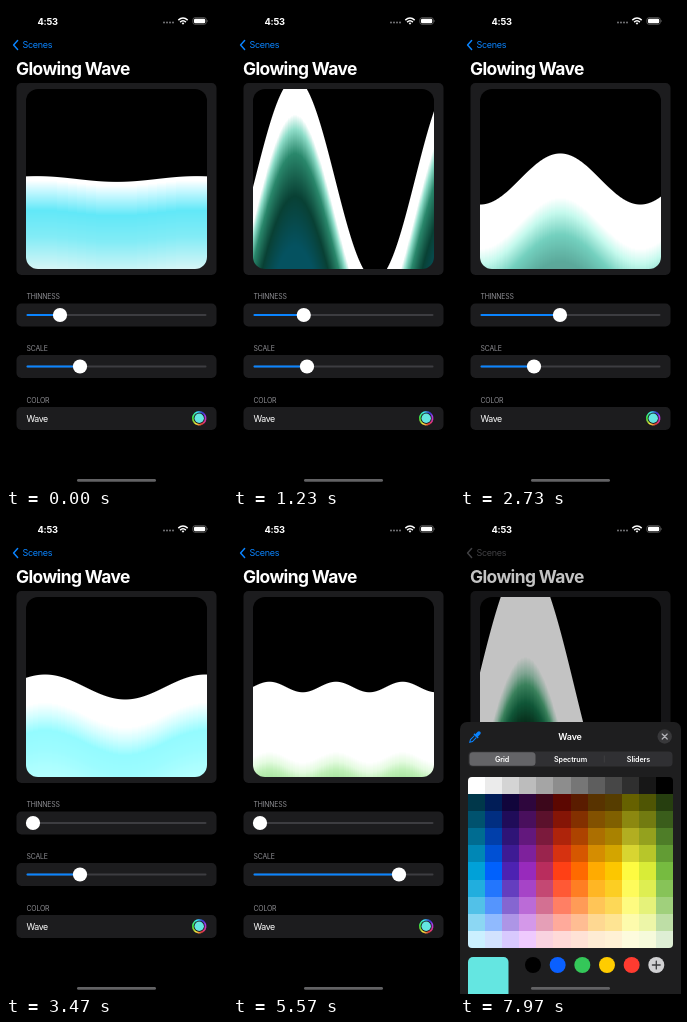
An HTML page with a canvas for the animation above (8 s loop, 221 px wide and 480 px high).

```html
<!DOCTYPE html>
<html lang="en">
<head>
<meta charset="utf-8">
<title>Glowing Wave</title>
<style>
  html, body { margin: 0; width: 100%; height: 100%; overflow: hidden; background: #000; }
  svg { position: absolute; left: 0; top: 0; width: 221px; height: 480px; display: block; }
  canvas { position: absolute; left: 20px; top: 83px; width: 181px; height: 180px; border-radius: 12px; }
  text { font-family: Inter, Roboto, sans-serif; fill: #fff; }
  .head { font-size: 6.9px; letter-spacing: -.2px; fill: #8e8e93; }
  .tab { font-size: 7.2px; font-weight: 600; text-anchor: middle; letter-spacing: -.1px; }
</style>
</head>
<body>
<svg viewBox="0 0 221 480">
  <g id="nav" stroke="#0a84ff">
    <path d="M11.6 34.6L7.6 39L11.6 43.4" fill="none" stroke-width="1.5" stroke-linecap="round" stroke-linejoin="round"/>
    <text id="back" x="16.5" y="42.4" font-size="9" letter-spacing="-.3" stroke="none">Scenes</text>
  </g>
  <text x="10" y="69" font-size="17.4" font-weight="700" letter-spacing="-.6">Glowing Wave</text>
  <g fill="#1c1c1e">
    <rect x="10.5" y="77" width="200" height="192" rx="5"/>
    <rect x="10.5" y="297.5" width="200" height="23" rx="5"/>
    <rect x="10.5" y="349" width="200" height="23" rx="5"/>
    <rect x="10.5" y="401" width="200" height="23" rx="5"/>
  </g>
  <text class="head" x="20.5" y="293">THINNESS</text>
  <text class="head" x="20.5" y="345">SCALE</text>
  <text class="head" x="20.5" y="396.5">COLOR</text>
  <g id="sliders"></g>
  <text x="20.5" y="415.6" font-size="8.8" letter-spacing="-.4">Wave</text>
  <g id="well"></g>
</svg>
<canvas id="wave" width="181" height="180"></canvas>
<svg viewBox="0 0 221 480">
  <rect id="dim" width="221" height="480" opacity="0"/>
  <text x="31.5" y="18.6" font-size="9.3" font-weight="700" letter-spacing="-.2">4:53</text>
  <g fill="#77777a">
    <circle cx="158" cy="16.6" r="1"/><circle cx="161" cy="16.6" r="1"/>
    <circle cx="164" cy="16.6" r="1"/><circle cx="167" cy="16.6" r="1"/>
  </g>
  <g fill="none" stroke="#fff" stroke-width="1.5">
    <path d="M172.3 14.1Q177 9.9 181.7 14.1M174.1 16.1Q177 13.5 179.9 16.1"/>
    <path d="M175.6 17L177 18.7L178.4 17Q177 16 175.6 17Z" fill="#fff" stroke="none"/>
  </g>
  <rect x="186.9" y="11.7" width="13.4" height="6.6" rx="2.1" fill="none" stroke="#777" stroke-width=".7"/>
  <rect x="188" y="12.8" width="11.2" height="4.4" rx="1.2" fill="#fff"/>
  <path d="M201.2 13.8Q202.6 15 201.2 16.2Z" fill="#777"/>
  <g id="sheet">
    <rect width="221" height="320" rx="7" fill="#1e1e1f"/>
    <g transform="translate(15 15) rotate(45)" fill="#0a84ff">
      <rect x="-1.8" y="-7.4" width="3.6" height="6" rx="1.8"/>
      <rect x="-3" y="-2.4" width="6" height="1.7" rx=".8"/>
      <path d="M-1.4 -.4V5L0 7.4L1.4 5V-.4" fill="none" stroke="#0a84ff" stroke-width="1"/>
    </g>
    <text x="110" y="18" font-size="9" font-weight="600" text-anchor="middle" letter-spacing="-.2">Wave</text>
    <circle cx="204.7" cy="14.5" r="7.2" fill="#38383a"/>
    <path d="M202.2 12L207.2 17M207.2 12L202.2 17" stroke="#b5b5ba" stroke-width="1.2" stroke-linecap="round"/>
    <rect x="8.5" y="29.5" width="204" height="15" rx="4" fill="#303033"/>
    <rect x="9.5" y="30.3" width="66" height="13.4" rx="3.5" fill="#646467"/>
    <path d="M144.3 33.5V40.5" stroke="#48484a" stroke-width=".6"/>
    <text class="tab" x="42" y="39.7">Grid</text>
    <text class="tab" x="110.5" y="39.7">Spectrum</text>
    <text class="tab" x="178.5" y="39.7">Sliders</text>
    <clipPath id="round"><rect x="8" y="55" width="205" height="171" rx="4"/></clipPath>
    <g id="grid" clip-path="url(#round)" shape-rendering="crispEdges"></g>
    <rect x="8" y="235" width="40.5" height="41" rx="5" fill="#64e6e1"/>
    <g id="dots"></g>
    <path d="M192.4 243H200.2M196.3 239.1V246.9" stroke="#3a3a3c" stroke-width="1.3" stroke-linecap="round"/>
  </g>
  <rect x="71" y="473" width="79" height="2.8" rx="1.4" fill="#626264"/>
</svg>
<script>
const LOOP = 8000;
const $ = id => document.getElementById(id);
const clamp = v => Math.max(0, Math.min(1, v));
const mix = (a, b, p) => a + (b - a) * p;
const ease = p => p * p * (3 - 2 * p);
const rgb = h => [0, 2, 4].map(i => parseInt(h.substr(i, 2), 16));
const mixRgb = (a, b, p) => a.map((v, i) => mix(v, b[i], p));
const css = c => `rgb(${c.map(Math.round)})`;

function add(parent, tag, attrs) {
  const el = document.createElementNS('http://www.w3.org/2000/svg', tag);
  for (const k in attrs) el.setAttribute(k, attrs[k]);
  return parent.appendChild(el);
}

// Index of the segment holding v, and the position inside it
function locate(keys, v, at = k => k[0]) {
  let i = 0;
  while (i < keys.length - 2 && v >= at(keys[i + 1])) i++;
  const a = at(keys[i]), b = at(keys[i + 1]);
  return [i, clamp((v - a) / (b - a))];
}

function track(keys, t) {
  const [i, p] = locate(keys, t);
  return mix(keys[i][1], keys[i + 1][1], ease(p));
}

// Thumb positions over time
const thinKeys = [[0, 54], [1000, 54], [1800, 137], [2400, 137], [3250, 27], [LOOP, 27]];
const scaleKeys = [[0, 74], [3900, 74], [5000, 176], [5450, 166], [5590, 166], [5850, 76], [6250, 62], [LOOP, 62]];

// Glow below the crest: time, depths in px, colours at those depths
const glowKeys = [
  [0, [4, 14, 34, 60, 93], 'ffffff c8f8ff 62e8f8 82ecf6 d8f6f6'],
  [630, [8, 19, 38, 85, 145], 'ffffff 6cc8bc 087468 053c48 0884b8'],
  [1830, [64, 82, 112, 150, 190], 'ffffff b4f4d8 4c9c70 0c4420 022008'],
  [3470, [28, 40, 56, 74, 100], 'ffffff d4feff 94fbff 9cfcff b4ffff'],
  [5570, [70, 80, 88, 100, 140], 'ffffff e4fbe0 c0f0b8 a0e098 80c878'],
  [7170, [36, 51, 76, 115, 182], 'ffffff 98e8e8 10a0a4 088c98 0890d0'],
  [7970, [98, 114, 126, 144, 165], 'ffffff a8d8c0 4ca878 147048 083820']
].map(([t, depth, cols]) => [t, depth, cols.split(' ').map(rgb)]);

function glowAt(t) {
  const [i, p] = locate(glowKeys, t);
  const [, d0, c0] = glowKeys[i], [, d1, c1] = glowKeys[i + 1];
  return d0.map((d, j) => [mix(d, d1[j], p), mixRgb(c0[j], c1[j], p)]);
}

const ctx = $('wave').getContext('2d');
const W = 181, H = 180;
const img = ctx.createImageData(W, H);
const RAMP = 320;

function drawWave(t, thumb) {
  const T = t / 1000 + 0.05;
  const k = (1 + 9 * (thumb - 27) / 167) / 90;
  const s = Math.sin(T);
  const amp = 2.1 * s * (1 + s) / k;
  const stops = glowAt(t), ramp = [];
  for (let d = 0; d < RAMP; d++) {
    const [i, p] = locate(stops, d);
    ramp.push(mixRgb(stops[i][1], stops[i + 1][1], p));
  }
  for (let x = 0; x < W; x++) {
    const angle = k * (x - 90) - T + 0.04;
    const crest = 90 + amp * Math.cos(angle);
    const slope = Math.hypot(1, amp * k * Math.sin(angle));
    for (let y = 0; y < H; y++) {
      const d = y + 0.5 - crest, cover = clamp(d / slope + 0.5);
      const c = ramp[Math.min(RAMP - 1, Math.max(0, Math.round(d)))];
      const o = (y * W + x) * 4;
      for (let j = 0; j < 3; j++) img.data[o + j] = c[j] * cover;
      img.data[o + 3] = 255;
    }
  }
  ctx.putImageData(img, 0, 0);
}

function slider(y) {
  const g = $('sliders');
  add(g, 'rect', { x: 20.5, y: y - 1, width: 180, height: 2, rx: 1, fill: '#3d3d41' });
  const bar = add(g, 'rect', { x: 20.5, y: y - 1, height: 2, rx: 1, fill: '#0a84ff' });
  const knob = add(g, 'circle', { cy: y, r: 7.1, fill: '#fff' });
  return x => {
    bar.setAttribute('width', x - 20.5);
    knob.setAttribute('cx', x);
  };
}
const setThin = slider(309), setScale = slider(360.5);

// Colour well
for (let i = 0; i < 36; i++) {
  const pt = a => `${193.2 + 6.4 * Math.cos(a)} ${412.3 + 6.4 * Math.sin(a)}`;
  const a = i * Math.PI / 18;
  add($('well'), 'path', {
    d: `M${pt(a)}L${pt(a + 0.19)}`, stroke: `hsl(${(300 + i * 10) % 360} 90% 60%)`, 'stroke-width': 1.6
  });
}
add($('well'), 'circle', { cx: 193.2, cy: 412.3, r: 4.7, fill: '#64e6e1' });

// Picker grid: each column runs dark, pure, light
const palette = [
  '00374a 011d57 11053b 2e063d 3c071b 5c0701 5a1c00 583300 563d00 666100 4f5504 263e0f',
  '00a1d8 0061fd 4d22b2 982abc b92d5d ff4015 ff6a00 ffab01 fcc700 fefb41 d9ec37 76bb40',
  'cbf0ff d2e2fe d8c9fe efcafe f9d3e0 ffdad8 ffe2d6 feecd4 fff1d5 fdfbdd f6fadb deeed4'
].map(r => r.split(' ').map(rgb));
const CELL = 205 / 12;
for (let r = 0; r < 10; r++) for (let c = 0; c < 12; c++) {
  const [dark, pure, light] = palette.map(row => row[c]);
  const grey = c ? 235 * (1 - (c - 1) / 10) : 255;
  const col = !r ? [grey, grey, grey]
    : r < 5 ? mixRgb(dark, pure, (r - 1) / 4)
    : mixRgb(pure, light, ((r - 5) / 4) ** 1.3);
  add($('grid'), 'rect', { x: 8 + c * CELL, y: 55 + r * CELL, width: CELL + 0.3, height: CELL + 0.3, fill: css(col) });
}
['#000', '#0a60ff', '#34c759', '#ffcc00', '#ff3b30', '#d0d0d2'].forEach((fill, i) =>
  add($('dots'), 'circle', { cx: 73 + i * 24.66, cy: 243, r: 8, fill }));

function render(t) {
  const scale = track(scaleKeys, t);
  setThin(track(thinKeys, t));
  setScale(scale);
  drawWave(t, scale);

  const up = 1 - (1 - clamp((t - 7600) / 600)) ** 3;
  $('sheet').setAttribute('transform', `translate(0 ${480 - 288 * up})`);
  $('dim').setAttribute('opacity', 0.25 * up);
  const tint = css(mixRgb([10, 132, 255], [84, 84, 88], clamp(up * 1.5)));
  $('nav').setAttribute('stroke', tint);
  $('back').style.fill = tint;
}

const start = performance.now();
function tick() {
  render((performance.now() - start) % LOOP);
  requestAnimationFrame(tick);
}
tick();
</script>
</body>
</html>
```
